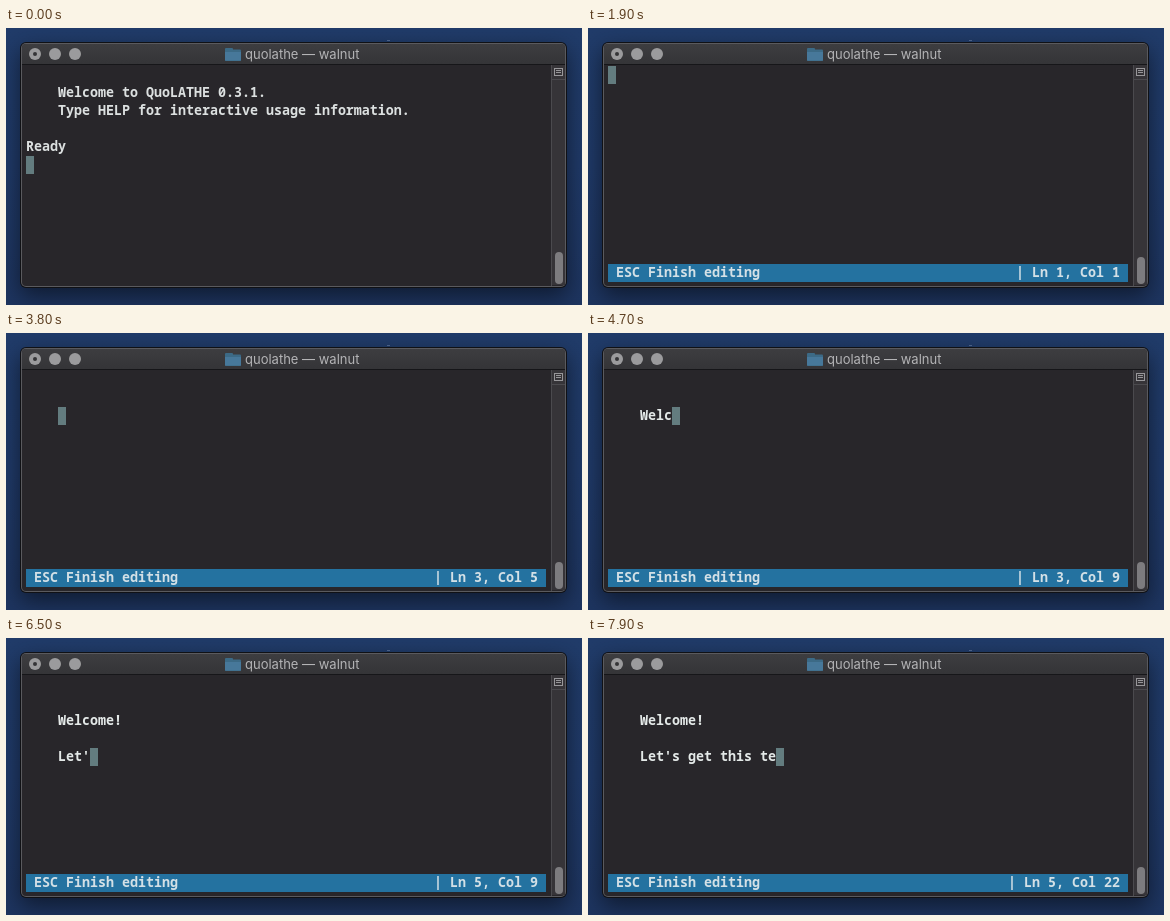
An HTML page with a canvas that plays this animation: 576x277 px, repeating every 8 s.

```html
<!DOCTYPE html>
<html lang="en">
<head>
<meta charset="utf-8">
<title>Terminal editor</title>
<style>
  html, body { margin: 0; width: 100%; height: 100%; overflow: hidden; background: #1d345f; }
  canvas { display: block; }
</style>
</head>
<body>
<canvas id="stage" width="576" height="277"></canvas>
<script>
const ctx = document.getElementById('stage').getContext('2d');
const W = 576, H = 277, LOOP = 8000;
const CELL_W = 8, CELL_H = 18, LEFT = 20, TOP = 38;
const MONO = '600 13.333px "Noto Sans Mono", "DejaVu Sans Mono", monospace';
const SANS = '13px Inter, "Open Sans", sans-serif';

const EDITOR_AT = 1900;
const BANNER = [
  [1, '    Welcome to QuoLATHE 0.3.1.'],
  [2, '    Type HELP for interactive usage information.'],
  [4, 'Ready']
];

// Each run: start time, delay per key, keys
const SHELL_KEYS = [[900, 100, 'edi'], [1300, 0, 't']];
const EDITOR_KEYS = [
  [2800, 200, '\n\n'], [3200, 200, '    '],
  [4200, 200, 'We'], [4500, 200, 'lc'], [4800, 100, 'ome'], [5200, 0, '!'],
  [5700, 200, '\n\n'],
  [6100, 100, 'Let'], [6500, 100, "'s "], [6900, 100, 'get this '], [7900, 0, 'te']
];

function typed(runs, t) {
  const lines = [''];
  for (const [start, delay, keys] of runs) {
    [...keys].forEach((key, i) => {
      if (t < start + i * delay) return;
      const last = lines.length - 1;
      if (key === '\n') lines.push(lines[last].match(/^ */)[0]);
      else lines[last] += key;
    });
  }
  return lines;
}

function rect(x, y, w, h, color) {
  ctx.fillStyle = color;
  ctx.fillRect(x, y, w, h);
}

function roundRect(x, y, w, h, r, color) {
  ctx.fillStyle = color;
  ctx.beginPath();
  ctx.roundRect(x, y, w, h, r);
  ctx.fill();
}

function disc(x, y, r, color) {
  ctx.fillStyle = color;
  ctx.beginPath();
  ctx.arc(x, y, r, 0, Math.PI * 2);
  ctx.fill();
}

function gradient(y0, y1, ...colors) {
  const g = ctx.createLinearGradient(0, y0, 0, y1);
  colors.forEach((c, i) => g.addColorStop(i / (colors.length - 1), c));
  return g;
}

function print(row, col, text, color = '#dce0e0') {
  ctx.font = MONO;
  ctx.fillStyle = color;
  ctx.fillText(text, LEFT + col * CELL_W, TOP + row * CELL_H + 13);
}

function cursor(row, col) {
  rect(LEFT + col * CELL_W, TOP + row * CELL_H, CELL_W, CELL_H, '#637c7f');
}

function drawDesktop() {
  rect(0, 0, W, H, gradient(0, H, '#203b69', '#1f3967', '#1d345f'));
  ctx.save();
  ctx.shadowColor = 'rgba(0,0,0,0.5)';
  ctx.shadowBlur = 22;
  ctx.shadowOffsetY = 8;
  roundRect(14, 14, 547, 246, 6, '#101115');
  ctx.restore();
  rect(381, 12, 3, 1, '#4a6085');
}

function drawFolder() {
  roundRect(219, 20, 8, 5, 1, '#3c6a86');
  roundRect(219, 21.5, 16, 11.5, 1, '#3c6a86');
  rect(219, 24, 16, 8.5, '#47789a');
}

function drawWindow(thumbTop) {
  roundRect(15, 15, 545, 244, 5, '#5a5a5e');
  roundRect(16, 16, 543, 242, 4, '#28262a');
  roundRect(16, 16, 543, 21, [4, 4, 0, 0], gradient(16, 37, '#3d3d40', '#343437'));
  rect(16, 36, 543, 1, '#161619');

  for (const x of [29, 49, 69]) disc(x, 26, 6, '#9b9b9d');
  disc(29, 26, 2, '#343437');

  drawFolder();
  ctx.font = SANS;
  ctx.fillStyle = '#b4b4b6';
  ctx.fillText('quolathe — walnut', 239, 31);

  rect(545, 37, 14, 220, '#363438');
  rect(545, 37, 1, 221, '#4b4a4e');
  rect(545, 51, 14, 1, '#4b4a4e');
  ctx.strokeStyle = '#98979a';
  ctx.lineWidth = 1;
  ctx.strokeRect(548.5, 40.5, 8, 7);
  rect(550, 42, 5, 1, '#98979a');
  rect(550, 44, 5, 1, '#98979a');
  roundRect(549, thumbTop, 8, 256 - thumbTop, 4, '#7d7c7f');
}

function drawShell(t) {
  for (const [row, text] of BANNER) print(row, 0, text);
  const [line] = typed(SHELL_KEYS, t);
  print(5, 0, line);
  cursor(5, line.length);
}

function drawEditor(t) {
  const lines = typed(EDITOR_KEYS, t);
  lines.forEach((line, row) => print(row, 0, line, '#e4e9e8'));
  const row = lines.length - 1, col = lines[row].length;
  cursor(row, col);

  const place = `| Ln ${row + 1}, Col ${col + 1}`;
  rect(LEFT, TOP + 11 * CELL_H, 65 * CELL_W, CELL_H, '#2472a0');
  print(11, 1, 'ESC Finish editing', '#d3e0e6');
  print(11, 64 - place.length, place, '#d3e0e6');
}

function draw(now) {
  const t = now % LOOP;
  const editing = t >= EDITOR_AT;
  drawDesktop();
  drawWindow(editing ? 229 : 224);
  (editing ? drawEditor : drawShell)(t);
}

const began = performance.now();
function tick() {
  draw(performance.now() - began);
  requestAnimationFrame(tick);
}
tick();
</script>
</body>
</html>
```
